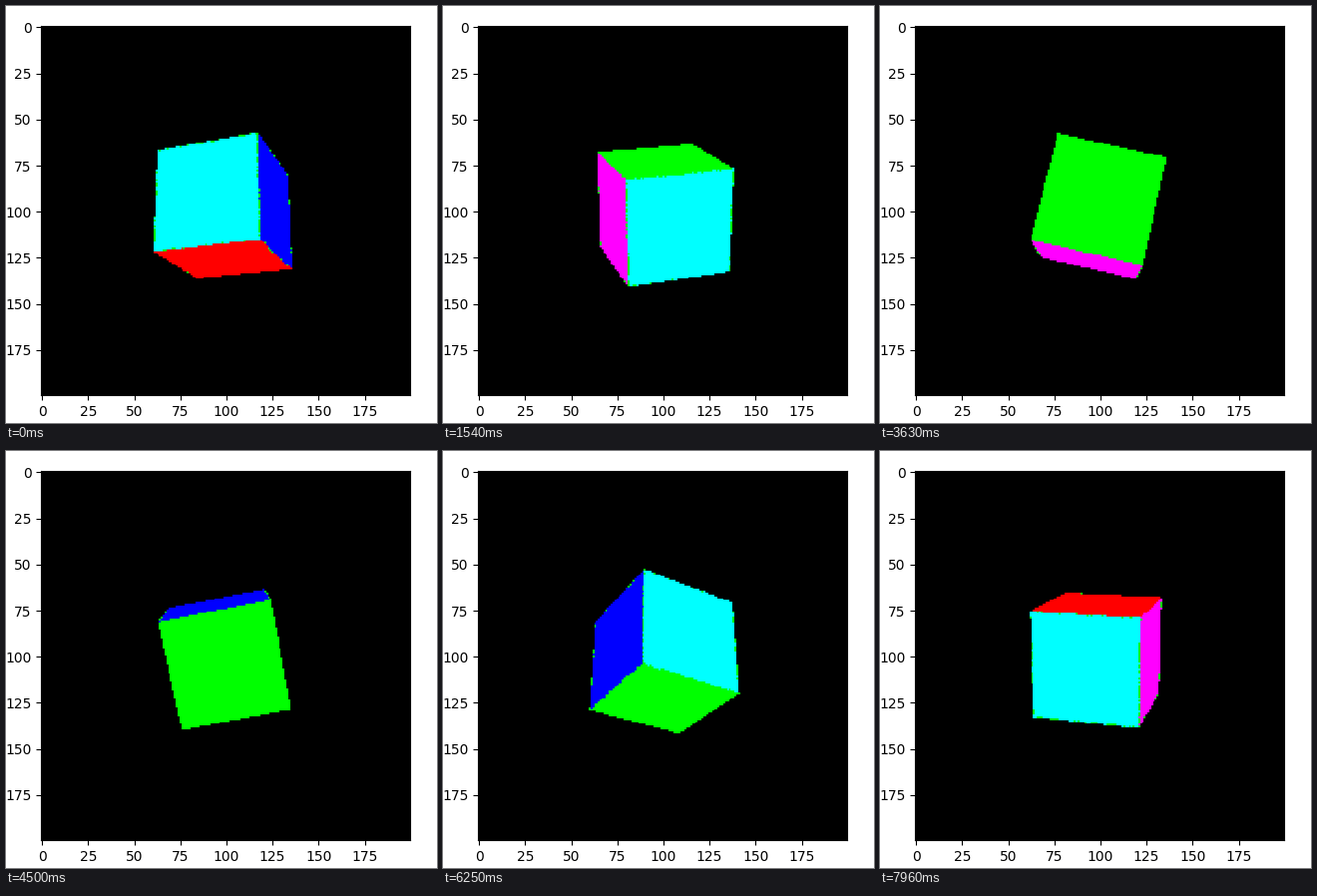
A matplotlib script for the animation above (8000 ms loop, 432 px wide and 418 px high).

```python
import numpy as np
import matplotlib.pyplot as plt
from matplotlib.animation import FuncAnimation

W, H, DPI = 432, 418, 100
FRAMES, LOOP = 192, 8000
N = 200            # image side in cells
DEPTH = 352.0      # camera distance, also the focal length
HALF = 28.3        # half of the cube's edge
START, STEP = -20.7, 1.137   # degrees, degrees per frame

GREEN = (0, 255, 0)
RED = (255, 0, 0)
# One row per axis: colour of the negative and of the positive face
FACES = np.array([
    [(255, 255, 0), (0, 255, 255)],
    [RED, GREEN],
    [(0, 0, 255), (255, 0, 255)],
], dtype=np.uint8)

grid = np.arange(N) - (N - 1) / 2
gx, gy = np.meshgrid(grid, grid)
rays = np.stack([gx, gy, np.full_like(gx, DEPTH)], axis=-1)
eye = np.array([0, 0, -DEPTH])


def cube_axes(angle):
    """Face normals for equal turn and tilt (x right, y down, z away)."""
    s, c = np.sin(angle), np.cos(angle)
    side = np.array([1, 0, 0])
    front = np.array([0, s, -c])
    up = np.array([0, -c, -s])
    return np.array([c * front + s * side, up, s * front - c * side])


def render(k):
    axes = cube_axes(np.radians(START + STEP * max(k - 1, 0)))
    origin = axes @ eye
    d = rays @ axes.T
    d = np.where(np.abs(d) < 1e-9, 1e-9, d)

    # Slab test against the box
    t1, t2 = (-HALF - origin) / d, (HALF - origin) / d
    near = np.minimum(t1, t2).max(axis=-1)
    far = np.maximum(t1, t2).min(axis=-1)
    hit = near < far

    p = (origin + near[..., None] * d) / HALF
    size = np.abs(p)
    face = size.argmax(axis=-1)
    sign = np.take_along_axis(p, face[..., None], axis=-1)[..., 0] > 0
    img = FACES[face, sign.astype(int)]

    # Broken green seams along the edges
    rnd = np.random.default_rng(k).random((N, N))
    edge = np.sort(size, axis=-1)[..., 1] > 0.978
    upright = size[..., 1] < 0.978
    chance = np.where(upright, 0.75, np.where(p[..., 1] > 0, 0.6, 0.15))
    img[edge & (rnd < chance)] = GREEN

    img[~hit] = 0
    return img


plt.rcParams["font.family"] = "DejaVu Sans"
fig = plt.figure(figsize=(W / DPI + 1e-6, H / DPI + 1e-6), dpi=DPI,
                 facecolor="white")
LEFT, TOP, SIDE = 35.2, 20.5, 369.6
ax = fig.add_axes([LEFT / W, (H - TOP - SIDE) / H, SIDE / W, SIDE / H])
picture = ax.imshow(render(0), interpolation="nearest")
ax.set_xticks(range(0, N, 25))
ax.set_yticks(range(0, N, 25))


def update(k):
    picture.set_data(render(k))
    return [picture]


anim = FuncAnimation(fig, update, frames=FRAMES, interval=LOOP / FRAMES,
                     repeat=True, repeat_delay=0, blit=False)
plt.show()
```
